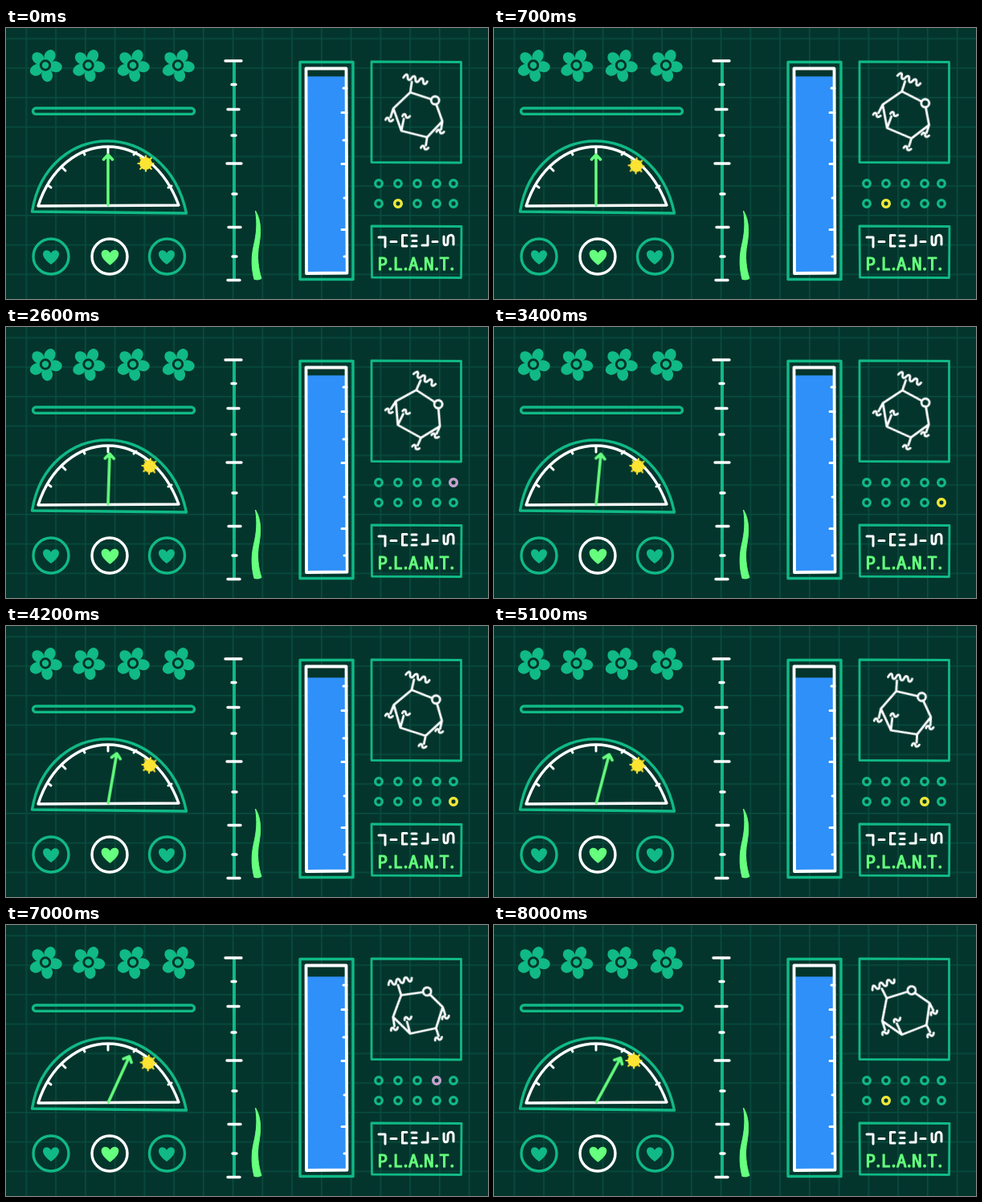
Write an HTML page that moves like this. It is 600 px wide and 338 px high and loops after 8.1 s.

```html
<!DOCTYPE html>
<html lang="en">
<head>
<meta charset="utf-8">
<title>Plant dashboard</title>
<style>
  :root {
    --bg: #04352c; --grid: #084d40; --teal: #10b985; --lime: #66ff7e;
    --blue: #2e90f8; --sun: #fde433; --pink: #cf9bd0; --loop: 8100ms;
  }
  html, body { margin: 0; width: 100%; height: 100%; overflow: hidden; background: var(--bg); }
  svg { display: block; width: 100vw; height: 100vh; }
  .line { fill: none; stroke-linecap: round; stroke-linejoin: round; stroke-width: 3.4; }
  .teal { stroke: var(--teal); }
  .white { stroke: #fff; }
  .lime { stroke: var(--lime); }
  .word { font: 21px "Noto Sans Mono", "DejaVu Sans Mono", monospace; letter-spacing: -3px;
          fill: var(--lime); stroke: var(--lime); stroke-width: 1.2; stroke-linejoin: round; }

  .needle, .sun, .sugar { animation: var(--loop) linear infinite; }
  .needle { transform-origin: 127px 222px; animation-name: needle; }
  .sun { transform-origin: 127px 222px; animation-name: sun; }
  .sugar { transform-origin: 512px 108px; animation-name: sugar; }
  .water { animation: water var(--loop) step-end infinite; }
  .lamp { animation: lamp var(--loop) step-end infinite; }

  @keyframes needle {
    0%, 23.5% { transform: rotate(0deg); }
    32.1% { transform: rotate(1.8deg); }
    41.98% { transform: rotate(5.4deg); }
    51.85% { transform: rotate(9.8deg); }
    74.07% { transform: rotate(19.8deg); }
    86.42% { transform: rotate(24.6deg); }
    98.77% { transform: rotate(28.5deg); }
    100% { transform: rotate(28.9deg); }
  }
  @keyframes sun {
    0%, 100% { transform: rotate(0deg); }
    8.64% { transform: rotate(3.4deg); }
    17.28% { transform: rotate(5.2deg); }
    25%, 74.07% { transform: rotate(5.6deg); }
    80% { transform: rotate(5deg); }
    86.42% { transform: rotate(3.6deg); }
    98.77% { transform: rotate(.1deg); }
  }
  @keyframes sugar {
    0% { transform: rotate(0deg); }
    8.64% { transform: rotate(9deg); }
    17.28% { transform: rotate(15deg); }
    24.69% { transform: rotate(16deg); }
    32.1% { transform: rotate(15deg); }
    41.98% { transform: rotate(10.3deg); }
    51.85% { transform: rotate(3.7deg); }
    62.96% { transform: rotate(-5.2deg); }
    74.07% { transform: rotate(-15.5deg); }
    86.42% { transform: rotate(-26deg); }
    98.77% { transform: rotate(-35.5deg); }
    100% { transform: rotate(-36.3deg); }
  }
  @keyframes water {
    0% { transform: translateY(0); }
    49.38%, 100% { transform: translateY(4px); }
  }
  @keyframes lamp {
    0% { transform: translate(488px, 219px); stroke: var(--sun); }
    25.93% { transform: translate(557px, 194px); stroke: var(--pink); }
    41.98% { transform: translate(557px, 219px); stroke: var(--sun); }
    61.73% { transform: translate(536px, 219px); stroke: var(--sun); }
    80.25% { transform: translate(536px, 194px); stroke: var(--pink); }
    92.59%, 100% { transform: translate(488px, 219px); stroke: var(--sun); }
  }
</style>
</head>
<body>
<svg viewBox="0 0 600 338" preserveAspectRatio="none">
  <defs>
    <pattern id="grid" x="24.5" y="12.5" width="36.75" height="36.75" patternUnits="userSpaceOnUse">
      <path d="M0 .8H36.75M.8 0V36.75" stroke="var(--grid)" stroke-width="1.6"/>
    </pattern>
    <ellipse id="petal" cx="12.5" rx="8.4" ry="6.9"/>
    <g id="flower">
      <g fill="var(--teal)">
        <use href="#petal" transform="rotate(-64)"/>
        <use href="#petal" transform="rotate(8)"/>
        <use href="#petal" transform="rotate(80)"/>
        <use href="#petal" transform="rotate(152)"/>
        <use href="#petal" transform="rotate(224)"/>
        <circle r="9"/>
      </g>
      <circle r="5.7" fill="none" stroke="var(--bg)" stroke-width="3"/>
    </g>
    <path id="heart" d="M0 9C-4 6-10 1-10-4C-10-10-2-10 0-5C2-10 10-10 10-4C10 1 4 6 0 9Z"/>
    <path id="curl" d="M-4.5 1.5C-4-2.5-1.5-2.5-.5 0S3 2.500 4.500-1" transform="rotate(15)"/>
    <circle id="ring" r="4.3" fill="none" stroke-width="3.3"/>
    <g id="rings">
      <use href="#ring" x="464"/><use href="#ring" x="488"/><use href="#ring" x="512"/>
      <use href="#ring" x="536"/><use href="#ring" x="557"/>
    </g>
  </defs>

  <rect width="600" height="338" fill="var(--bg)"/>
  <rect width="600" height="338" fill="url(#grid)"/>

  <use href="#flower" x="49" y="46.500"/>
  <use href="#flower" x="102.500" y="46.500"/>
  <use href="#flower" x="158" y="46.500"/>
  <use href="#flower" x="214" y="46.500"/>

  <rect class="line teal" x="33.5" y="100" width="201" height="7.4" rx="3.7"/>

  <!-- light dial -->
  <path class="line teal" d="M32.5 229C42 170 85 141 126 141S212 170 224.5 231Z"/>
  <path class="line white" d="M40 222C55 175 90 148 127 148S198 175 215 221Z"/>
  <path class="line white" style="stroke-width:3" d="M127 149V156M52 196l4 3M70 174l4 4M96 154l2 4M162 155l-3 3M206 197l-4 2"/>
  <path class="line lime needle" style="stroke-width:3.5" d="M127 221V159M121.5 164L127 158L132.5 164"/>
  <g class="sun">
    <g transform="translate(174 169)">
      <circle r="7.8" fill="var(--sun)"/>
      <path class="line" stroke="var(--sun)" style="stroke-width:2.2" d="M0-9.5V9.5M-9.5 0H9.5M-6.8-6.8L6.8 6.8M6.8-6.8L-6.8 6.8"/>
    </g>
  </g>

  <!-- health -->
  <circle class="line teal" cx="56" cy="285" r="22"/>
  <circle class="line white" cx="129" cy="285" r="22"/>
  <circle class="line teal" cx="200.5" cy="285" r="22"/>
  <use href="#heart" x="56" y="286" fill="var(--teal)"/>
  <use href="#heart" transform="translate(129.500 286) scale(1.08)" fill="var(--lime)"/>
  <use href="#heart" x="200" y="286" fill="var(--teal)"/>

  <!-- height scale -->
  <path class="line teal" style="stroke-width:4" d="M284 42V314"/>
  <path class="line white" d="M273 41H293M281 70.5H286M276 101.5H290M281 134H286M275 169H293M282 207H287M277 248.5H292M282 285H287M276 314.5H291"/>
  <path fill="var(--lime)" stroke="var(--lime)" stroke-linejoin="round" d="M310.5 228C318 240 317.5 256 315 270C312 285 314 300 318 312.500Q314 315 309 313.500C305 298 305.500 284 308.500 271C312 256 313 244 310.500 228Z"/>

  <!-- water tank -->
  <rect class="line teal" x="366" y="42.5" width="66" height="271"/>
  <rect x="374" y="51" width="50" height="255" fill="var(--bg)"/>
  <svg x="375" y="51" width="47.5" height="253.5">
    <rect class="water" y="9.400" width="47.5" height="250" fill="var(--blue)"/>
  </svg>
  <path class="line white" style="stroke-width:3.8" d="M373.5 50.5L423.5 50.5L424.5 305.5L374 306Z"/>
  <path class="line white" style="stroke-width:3" d="M424 75H420M424 105.5H418M424 140H420M424 169.5H418M424 212H421M424 251.5H418M424 285H421"/>

  <!-- sugar molecule -->
  <path class="line teal" style="stroke-width:2.8" d="M455 42L566.5 42.5L566.5 168L455 167.5Z"/>
  <g transform="translate(1.2 .3)">
    <g class="sugar line white" style="stroke-width:2.8">
      <path d="M528 88.5L502 80L481 100L491 128L523 136L542 116L534.5 95M502 80L504 67M481 100L477.5 111M491 128L494 113M542 116L540.5 126M523 136L521.5 146"/>
      <circle cx="533" cy="90" r="5"/>
      <path transform="translate(508.500 63.500) rotate(15)" d="M-15 2C-13-4-11-4-10 0S-6 4-5 0S-1-4 0 0S4 4 5 0S9-4 10 0S14 4 15-1"/>
      <use href="#curl" x="476" y="114"/>
      <use href="#curl" x="497" y="109.5"/>
      <use href="#curl" x="539.5" y="129"/>
      <use href="#curl" x="520" y="149"/>
    </g>
  </g>

  <!-- status lamps -->
  <g class="teal">
    <use href="#rings" y="194"/>
    <use href="#rings" y="219"/>
  </g>
  <g class="lamp"><use href="#ring"/></g>

  <!-- label -->
  <path class="line teal" style="stroke-width:2.8" d="M455 247L567 247.5L566.5 311.5L455.5 311Z"/>
  <path class="line white" style="stroke-width:3" d="M464 261H472V273M479 266.500H486M499 258.500H493.500V272H499M505 259H511M506 265.500H511M505 272H511M525 259V271H518M531 266.500H537M545 260V267C545 272 550 272 550 267V263C550 257 557 257 557 262V270"/>
  <text class="word" x="462.5" y="302">P.L.A.N.T.</text>
</svg>
</body>
</html>
```
